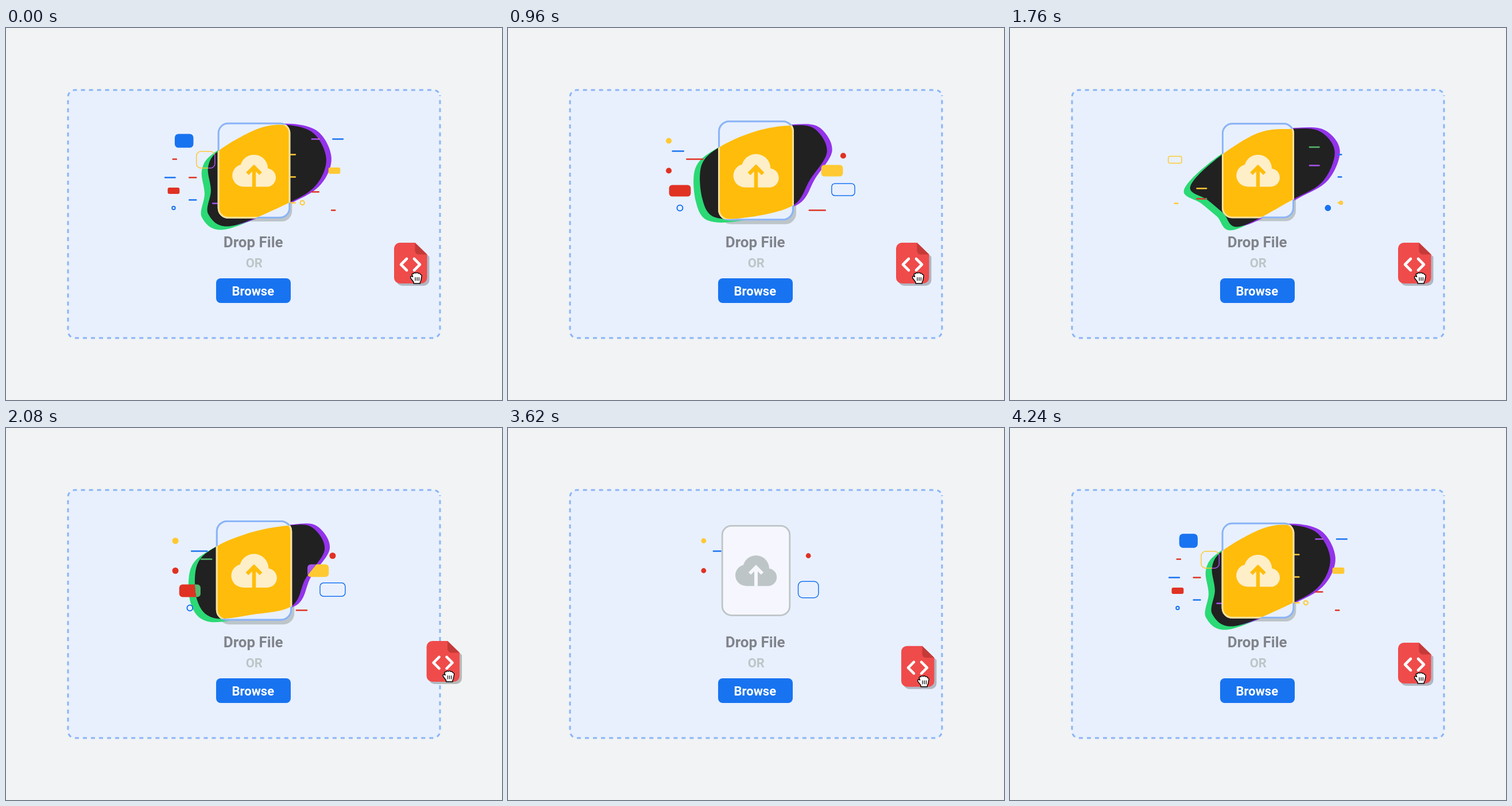
Animation, 864 px wide and 648 px high, one loop 4.26 s. Source, as an HTML page with a canvas:

```html
<!DOCTYPE html>
<html lang="en">
<head>
<meta charset="utf-8">
<title>Drop File</title>
<style>
  html, body { margin: 0; width: 100%; height: 100%; overflow: hidden; background: #f1f3f4; }
  svg, canvas { position: absolute; left: 0; top: 0; width: 864px; height: 648px; }
  text { font-family: Roboto, sans-serif; font-weight: 700; text-anchor: middle; }
</style>
</head>
<body>
<svg viewBox="0 0 864 648">
  <rect id="panel" x="108" y="108" width="648" height="432" rx="12" fill="#e8f0fe"/>
  <path d="M756 117V528a12 12 0 0 1-12 12H120a12 12 0 0 1-12-12V120a12 12 0 0 1 12-12H744a12 12 0 0 1 12 9"
    fill="none" stroke="#8ab4f8" stroke-width="3" stroke-dasharray="7.015" stroke-dashoffset="5.5"/>
  <text x="430.7" y="382" font-size="26" fill="#80838a">Drop File</text>
  <text x="432.3" y="417" font-size="22" fill="#bdc5c7">OR</text>
  <rect x="366" y="436" width="130" height="43" rx="8" fill="#1873f0"/>
  <text x="430.3" y="465.5" font-size="22" fill="#fff">Browse</text>
</svg>
<canvas id="stage" width="864" height="648"></canvas>
<script>
const LOOP = 4260, JOIN = 4240, CYCLE = 1300;
const CENTER = { x: 432, y: 248.3 };
const panel = document.getElementById('panel');
const ctx = document.getElementById('stage').getContext('2d');

const COLORS = { blue: '#1873f0', red: '#e03223', yellow: '#ffc933', green: '#55b96e', purple: '#a855f0' };
// Colour a particle takes while it is over the dark blob
const SWAP = { blue: 'yellow', red: 'green', yellow: 'purple' };

// Each wave flies outwards from the card; a particle is colour, shape and row
const WAVES = [
  { birth: -30, life: 280, from: 95, to: 168,
    left: 'blue box 196, red dash 260, blue dash 299', right: 'yellow dash 193, red dash 285' },
  { birth: -20, life: 560, from: 62, to: 147,
    left: 'yellow frame 229, yellow dash 305',
    right: 'blue dash 220, blue dash 259, yellow dash 304, yellow ring 304' },
  { birth: 400, life: 380, from: 82, to: 152,
    left: 'blue dash 279, red dash 297', right: 'red dash 207, yellow dash 239, blue dot 313' },
  { birth: 655, life: 500, from: 60, to: 160,
    left: 'yellow dot 196, blue dash 214, red dot 248', right: 'red dot 222, blue frame 281' },
  { birth: 720, life: 680, from: 74, to: 142,
    left: 'red dash 228, red box 283, blue ring 313', right: 'yellow box 248, red dash 317' },
  { birth: 950, life: 480, from: 5, to: 169, left: 'blue dash 260', right: 'blue dash 193' }
];
const SIZES = { dot: [11, 11], ring: [10, 10], box: [38, 20], frame: [44, 23] };

// Three key poses of the blob: upright, stretched to the left, leaning right
const POSES = [
  { at: 80, points: [440,175, 490,169, 536,184, 558,229, 541,274, 493,304, 390,346, 352,324, 358,282, 353,242, 372,213] },
  { at: 520, points: [430,184, 492,176, 540,180, 566,215, 545,267, 492,299, 400,346, 372,322, 343,300, 312,279, 355,232] },
  { at: 780, points: [430,181, 492,170, 533,173, 555,212, 522,262, 498,310, 430,325, 362,331, 333,300, 333,238, 369,205] }
];

const clamp = v => Math.min(1, Math.max(0, v));
const mix = (a, b, p) => a + (b - a) * p;
const ramp = (t, from, to) => clamp((t - from) / (to - from));
const wave = p => (1 + Math.cos(2 * Math.PI * p)) / 2;
const wrap = t => (t % CYCLE + CYCLE) % CYCLE;

function roundRect(x, y, w, h, r) {
  const path = new Path2D();
  path.roundRect(x, y, w, h, Math.min(r, w / 2, h / 2));
  return path;
}

function stroke(path, color, width) {
  ctx.strokeStyle = color;
  ctx.lineWidth = width;
  ctx.stroke(path);
}

function fill(path, color) {
  ctx.fillStyle = color;
  ctx.fill(path);
}

function layer(draw) {
  ctx.save();
  draw();
  ctx.restore();
}

function zoomed(scale, draw) {
  layer(() => {
    ctx.translate(CENTER.x, CENTER.y);
    ctx.scale(scale, scale);
    ctx.translate(-CENTER.x, -CENTER.y);
    draw();
  });
}

// Smooth closed curve through the blended pose, grown from the middle of the card
function blobPath(time, grow) {
  const phase = wrap(time - POSES[0].at) + POSES[0].at;
  const i = POSES.findLastIndex(pose => pose.at <= phase);
  const now = POSES[i], next = POSES[(i + 1) % POSES.length];
  const p = 1 - wave((phase - now.at) / wrap(next.at - now.at) / 2);
  const n = now.points.length / 2;
  const coord = (k, middle) => mix(middle, mix(now.points[k], next.points[k], p), grow);
  const point = j => {
    const k = (j + n) % n * 2;
    return [coord(k, CENTER.x), coord(k + 1, CENTER.y)];
  };
  const path = new Path2D();
  path.moveTo(...point(0));
  for (let j = 0; j < n; j++) {
    const [a, b, c, d] = [-1, 0, 1, 2].map(step => point(j + step));
    path.bezierCurveTo(
      b[0] + (c[0] - a[0]) / 6, b[1] + (c[1] - a[1]) / 6,
      c[0] - (d[0] - b[0]) / 6, c[1] - (d[1] - b[1]) / 6, ...c);
  }
  path.closePath();
  return path;
}

function drawDash(x, y, length, color) {
  const h = Math.min(2.6, length);
  fill(roundRect(x - length / 2, y - h / 2, length, h, 1), color);
}

// Bodies pop out tall and narrow, then shrink away
function drawBody(shape, x, y, age, q, color) {
  const [width, height] = SIZES[shape];
  const size = 1 - q ** 5, grow = 1 - Math.exp(-age / 16);
  const round = width === height;
  const w = width * size * grow;
  const h = height * size * (round ? grow : 1 + 0.45 * Math.exp(-age / 40));
  const path = roundRect(x - w / 2, y - h / 2, w, h, round ? h / 2 : h * 0.27);
  if (shape === 'ring') stroke(path, color, 2);
  else if (shape === 'frame') stroke(path, color, 1.5);
  else fill(path, color);
}

function drawWave({ life, from, to, left, right }, age, tint) {
  const q = age / life;
  const glide = 1 - (1 - q) ** 1.5;
  const burst = 0.8 * (1 - Math.exp(-age / 55)) + 0.2 * q;
  const length = (0.03 * life + 0.15 * (to - from)) * Math.sin(Math.PI * q ** 0.6);
  for (const [side, list] of [[-1, left], [1, right]]) {
    for (const item of list.split(', ')) {
      const [color, shape, row] = item.split(' ');
      const y = Number(row) + 0.5;
      const x = CENTER.x + side * mix(from, to, shape === 'dash' ? glide : burst);
      if (shape === 'dash') drawDash(x, y, length, tint(color));
      else drawBody(shape, x, y, age, q, tint(color));
    }
  }
}

// Waves repeat every cycle, but only start while the file is over the panel
function drawParticles(time, tint) {
  for (const item of WAVES) {
    const age = wrap(time - item.birth), born = time - age;
    if (born > -660 && born < 2150 && age < item.life) drawWave(item, age, tint);
  }
}

const cloud = new Path2D();
for (const [x, y, r] of [[414.5, 256.5, 18.5], [432, 245, 23], [453, 260, 15.2]]) {
  cloud.moveTo(x + r, y);
  cloud.arc(x, y, r, 0, 7);
}
cloud.rect(414, 250, 39, 25.2);
const arrow = new Path2D('M421 253.5L432 242.5L443 253.5M432 243V275.5');
const card = roundRect(373.2, 170.3, 117.6, 156, 16);

function drawPlate(color, border) {
  fill(card, color);
  stroke(card, border, 2.8);
}

function drawIcon(color, arrowColor) {
  fill(cloud, color);
  stroke(arrow, arrowColor, 6);
}

function drawCard(scale, blob, lit) {
  zoomed(scale, () => {
    drawPlate('#f6f7fe', '#bdc5c7');
    drawIcon('#bdc5c7', '#f6f7fe');
  });
  layer(() => {
    ctx.globalAlpha = lit;
    zoomed(scale, () => drawPlate('#e8f0fe', '#8ab4f8'));
    ctx.clip(blob);
    zoomed(scale, () => {
      drawPlate('#ffbc0a', '#fde293');
      drawIcon('#feefc9', '#ffbc0a');
    });
  });
}

const sheet = new Path2D('M10 0H36.5L57.5 20.5V61a10 10 0 0 1-10 10H10a10 10 0 0 1-10-10V10A10 10 0 0 1 10 0Z');
const fold = new Path2D('M36.5 0L57.5 20.5H43a6.5 6.5 0 0 1-6.5-6.5Z');
const brackets = new Path2D('M22 28L12 38L22 48M35 28L45 38L35 48');
const hand = new Path2D('M34 71V68.5L29 62Q27.6 58.7 30.6 58.3L32.6 59.5L31.2 55.6Q31.6 52.8 34 54' +
  'Q35.4 51 38 53Q40.6 51 42 53.4Q45.2 52.6 45.8 55.4Q48.8 55.6 48 59L46.6 66.5L45.4 68.5V71Z');
const knuckles = new Path2D('M37 60.5V66M40.2 60.5V66M43.4 60.5V66');

function drawFile(x, y) {
  layer(() => {
    ctx.lineCap = ctx.lineJoin = 'round';
    ctx.translate(x + 4, y + 4);
    fill(sheet, 'rgba(0, 0, 0, .24)');
    ctx.translate(-4, -4);
    fill(sheet, '#ef4b4b');
    fill(fold, '#c43a38');
    stroke(brackets, '#fff', 4.6);
    fill(hand, '#fff');
    stroke(hand, '#000', 1.4);
    stroke(knuckles, '#000', 1.2);
  });
}

// The file speeds away to the right and later glides in from the lower right
function filePlace(time) {
  if (time > 0) {
    const d = 0.00169 * Math.max(0, time - 1898) ** 2;
    return [676 + d, 374 - 0.0876 * d + 0.000607 * d * d];
  }
  const away = (1 - ramp(time, -950, -480)) ** 2.5;
  return [676 + 190 * away, 374 + 65 * away ** 0.8];
}

// Time runs from before zero, as the file enters, to its exit without a seam
function render(time) {
  const lit = ramp(time, -600, -500) * (1 - ramp(time, 2240, 2400));
  const grow = (1 - (1 - ramp(time, -600, -340)) ** 3) * (1 - ramp(time, 2160, 2440) ** 2);
  const swell = 0.1 * lit * wave((time + 290) / 1180);
  const scale = 1 + swell;
  const blob = blobPath(time, grow);

  panel.style.opacity = ramp(time, -810, -710) * (1 - ramp(time, 2140, 2260));
  ctx.clearRect(0, 0, 864, 648);

  layer(() => {
    ctx.globalAlpha = lit;
    ctx.translate(2 + 20 * swell, 4 + 25 * swell);
    zoomed(scale, () => drawPlate('#bdc5c9', '#bdc5c9'));
  });
  for (const [dx, dy, color] of [[-11, 6, '#2bd975'], [9, -2, '#9333ea']]) {
    layer(() => {
      ctx.translate(dx * grow, dy * grow);
      fill(blob, color);
    });
  }
  drawParticles(time, color => COLORS[color]);
  fill(blob, '#212121');
  layer(() => {
    ctx.clip(blob);
    drawParticles(time, color => COLORS[SWAP[color]]);
  });
  drawCard(scale, blob, lit);
  drawFile(...filePlace(time));
}

function tick() {
  const t = performance.now() % LOOP;
  render(t < 2900 ? t : Math.min(0, t - JOIN));
  requestAnimationFrame(tick);
}
tick();
</script>
</body>
</html>
```
